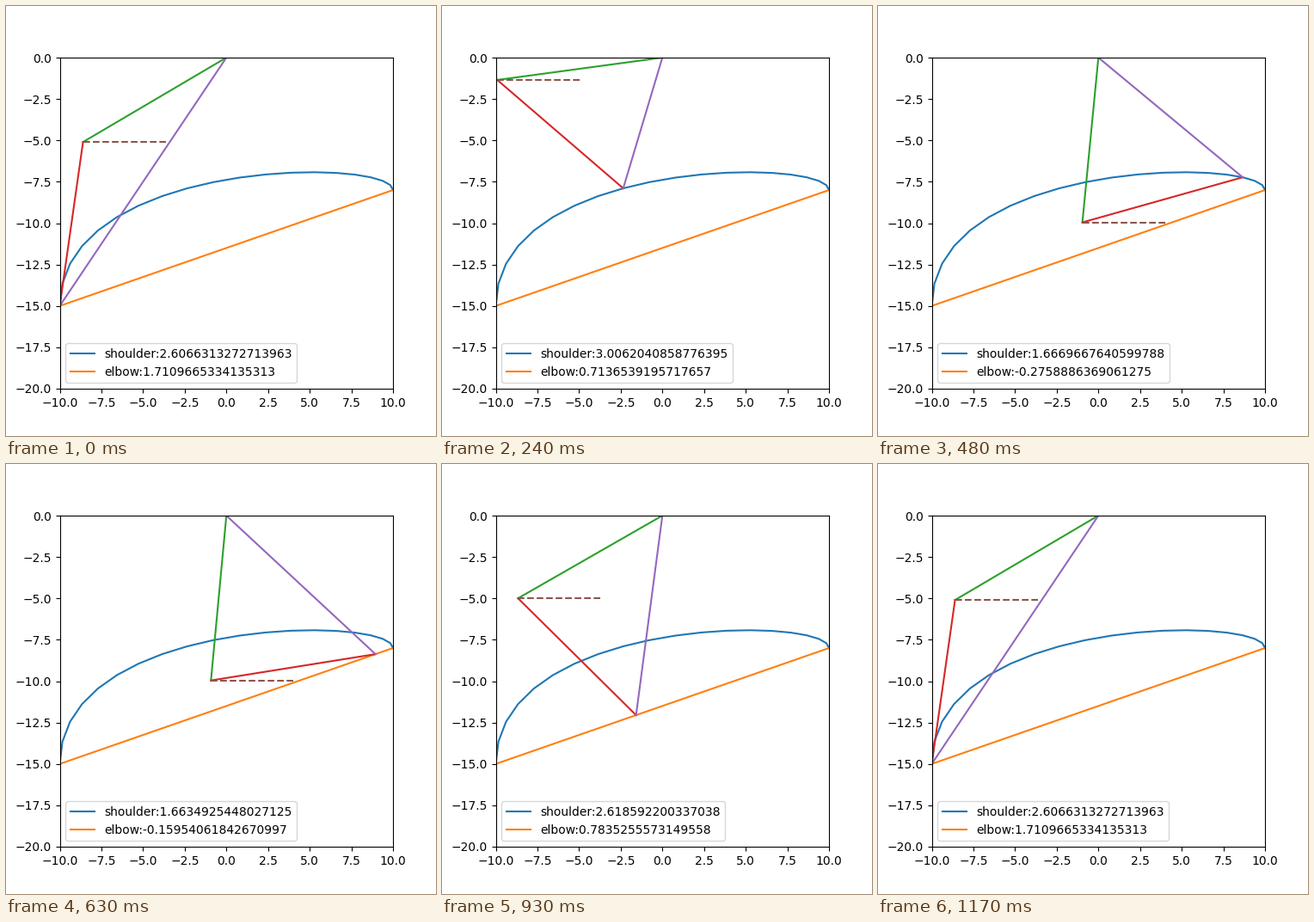
These frames come from a looping animation (500x500 px, 1.2 s). A matplotlib script:

```python
import math

import matplotlib.pyplot as plt
import numpy as np
from matplotlib.animation import FuncAnimation

LINK = 10      # length of each arm segment
STEPS = 20     # points on each half of the path

t = np.linspace(0, 1, STEPS)[:, None]
start, end = np.array([-10, -15]), np.array([10, -8])
lift, drop = np.array([-10, -6]), np.array([10, -6])

# The foot swings forward along a cubic Bezier and returns on a straight line.
swing = (start * (1 - t) ** 3 + 3 * lift * t * (1 - t) ** 2
         + 3 * drop * t ** 2 * (1 - t) + end * t ** 3)
stance = end + (start - end) * t
path = np.vstack([swing, stance])


def solve(x, y):
    """Angles of both segments below the horizontal."""
    reach = math.hypot(x, y)
    aim = math.atan2(-y, x)
    bend = math.acos(reach / (2 * LINK))
    return aim + bend, aim - bend


fig, ax = plt.subplots(figsize=(5, 5), dpi=100)
ax.set(xlim=(-10, 10), ylim=(-20, 0),
       xticks=np.arange(-10, 10.1, 2.5), yticks=np.arange(-20, 0.1, 2.5))

ax.plot(*swing.T, color="C0", label="shoulder:")
ax.plot(*stance.T, color="C1", label="elbow:")
upper, = ax.plot([], [], color="C2")
lower, = ax.plot([], [], color="C3")
direct, = ax.plot([], [], color="C4")
level, = ax.plot([], [], "--", color="C5")
shoulder_text, elbow_text = ax.legend(loc="lower left").get_texts()


def update(i):
    x, y = path[i]
    shoulder, elbow = solve(x, y)
    ex, ey = LINK * math.cos(shoulder), -LINK * math.sin(shoulder)
    upper.set_data([0, ex], [0, ey])
    lower.set_data([ex, x], [ey, y])
    direct.set_data([0, x], [0, y])
    level.set_data([ex, ex + 5], [ey, ey])
    shoulder_text.set_text(f"shoulder:{shoulder}")
    elbow_text.set_text(f"elbow:{elbow}")
    return upper, lower, direct, level, shoulder_text, elbow_text


anim = FuncAnimation(fig, update, frames=len(path), interval=30,
                     repeat=True, repeat_delay=0)
plt.show()
```
